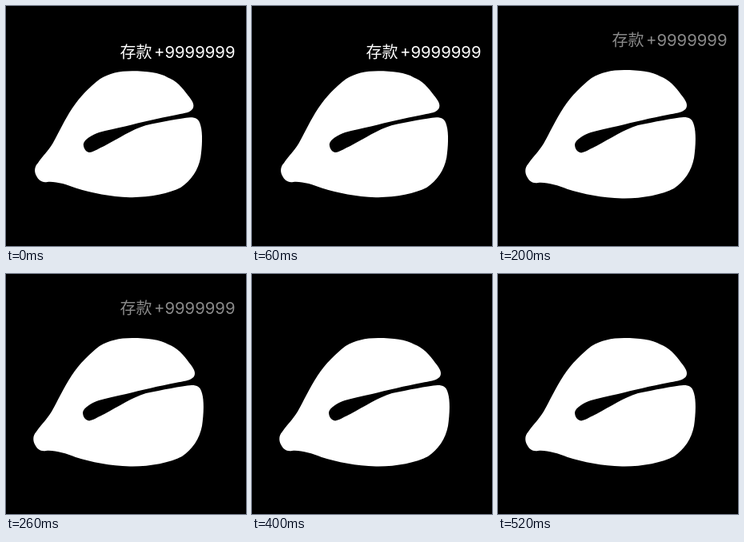
An HTML page for the animation above (600 ms loop, 300 px wide and 300 px high).

```html
<!DOCTYPE html>
<html lang="zh">
<head>
<meta charset="utf-8">
<style>
  html, body { margin: 0; width: 100%; height: 100%; overflow: hidden; background: #000; }
  svg { display: block; width: 100vw; height: 100vh; fill: #fff; }
</style>
</head>
<body>
<svg viewBox="0 0 300 300">
  <path id="fish" d="M236 124
    C236 120 233 116 229 111 C222 101 214 92 203 88 C193 82 176 80 158 80
    C141 80 129 83 117 90 C104 100 92 112 82 127 C72 142 65 158 57 172
    C51 182 44 188 38 197 C34 201 33 207 36 213 C39 219 43 222 50 221
    C61 220 74 224 87 229 C107 235 130 240 155 240.500
    C178 241 205 236 220 228 C233 219 242 206 245 190 C247 177 248 159 245 149
    C243 141 239 139 232 139 C219 140 195 145 175 149
    C158 154 140 166 123 175 C116 178 111 182 104 183.500
    C99 183 96 178 96 173 C97 167 107 161 116 158
    C126 155 137 153 150 150 C169 145 192 140 212 136
    C222 134 230 133 233 130 Q236 128 236 124Z"/>
  <g id="label">
    <text x="142.500" y="65" font-size="20" font-family="'Noto Sans CJK SC', 'Noto Sans CJK', sans-serif">存款</text>
    <text x="185" y="64.800" font-size="20.300" font-family="Inter, sans-serif">+9999999</text>
  </g>
</svg>
<script>
  const STEP = 100, STEPS = 6, RISE = 15;
  const scales = [0.983, 0.966];
  const opacities = [1, 1, 0.54, 0.09];
  const fish = document.getElementById('fish');
  const label = document.getElementById('label');

  function draw() {
    const step = Math.floor(performance.now() / STEP) % STEPS;
    const scale = scales[step] ?? 1;
    const lift = RISE * Math.max(0, step - 1);
    fish.setAttribute('transform', `translate(141 160.500) scale(${scale}) translate(-141 -160.500)`);
    label.setAttribute('transform', `translate(0 ${-lift})`);
    label.setAttribute('opacity', opacities[step] ?? 0);
    requestAnimationFrame(draw);
  }
  draw();
</script>
</body>
</html>
```
